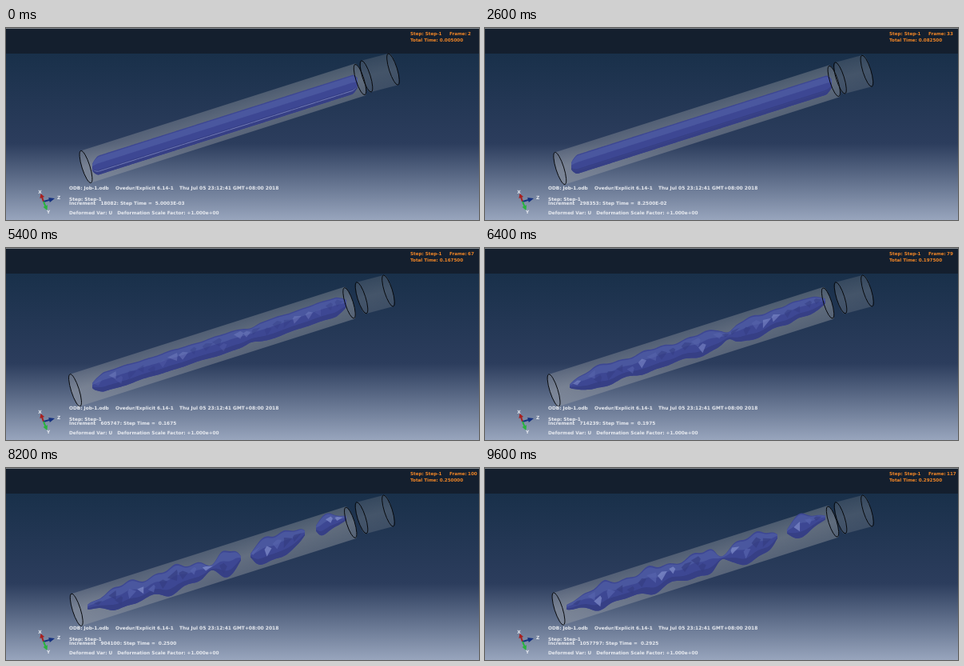
Animation of 592x240 px, one loop 9.8 s. Source, as an HTML page with a canvas:

```html
<!DOCTYPE html>
<html lang="en">
<head>
<meta charset="utf-8">
<title>Tube simulation</title>
<style>
html, body { margin: 0; width: 100%; height: 100%; overflow: hidden; background: #141f2e; }
canvas { display: block; }
</style>
</head>
<body>
<canvas id="stage" width="592" height="240"></canvas>
<script>
const ctx = document.getElementById('stage').getContext('2d');
const STEP_MS = 200, STEPS = 49;
const SLOPE = -0.317, TILT = Math.atan(SLOPE);

// Places where the fluid column pinches, strongest at the step `peak`
const necks = [
  { x: 257, drift: 0, peak: 41, span: 4, width: 10, depth: 0.75 },
  { x: 300, drift: -0.5, peak: 41, span: 11, width: 9, depth: 1.25 },
  { x: 381, drift: -1.3, peak: 44, span: 9, width: 10, depth: 1.4 }
];

const lerp = (a, b, f) => a + (b - a) * f;
const clamp01 = v => Math.max(0, Math.min(1, v));
const ramp = (v, from, to) => clamp01((v - from) / (to - from));
const smooth = (v, from, to) => { const f = ramp(v, from, to); return f * f * (3 - 2 * f); };
const bell = v => Math.exp(-v * v);
const noise = n => { const v = Math.sin(n * 12.9898) * 43758.5453; return v - Math.floor(v); };
const axisY = x => 174 + SLOPE * (x - 100);

function fluidEdges(step) {
  const rough = smooth(step, 22, 41);
  const left = 108 - 7 * smooth(step, 27, 41);
  const right = 441 - 14 * smooth(step, 0, 27);
  const taper = lerp(8, 50, rough);

  return x => {
    const fromEnd = Math.min(x - left, right - x);
    let half = (12 + 2 * rough) * Math.sqrt(clamp01((fromEnd + 1) / taper));
    half *= 1 + 0.2 * rough * Math.cos((x - 208) * 0.1);
    for (const n of necks) {
      const center = n.x + n.drift * (step - 41);
      half *= 1 - clamp01(n.depth * bell((step - n.peak) / n.span) * bell((x - center) / n.width));
    }
    const mid = axisY(x) + 2.5 - 2 * ramp(step, 0, 19) - 9 * rough * smooth(x, 330, 400);
    const wobble = rough * half / 7;
    return {
      x,
      top: mid - half + wobble * Math.sin(x * 0.23 + step * 0.3),
      bottom: mid + half + wobble * Math.sin(x * 0.17 - step * 0.2)
    };
  };
}

function polygon(points, color) {
  ctx.fillStyle = color;
  ctx.beginPath();
  points.forEach(([x, y]) => ctx.lineTo(x, y));
  ctx.closePath();
  ctx.fill();
}

function text(str, x, y, color = '#e6e9ef', size = 5.8) {
  ctx.font = `bold ${size}px "DejaVu Sans", sans-serif`;
  ctx.fillStyle = color;
  ctx.fillText(str, x, y);
}

function drawBackground() {
  const g = ctx.createLinearGradient(0, 32, 0, 240);
  g.addColorStop(0, '#19304a');
  g.addColorStop(0.54, '#2c3d5d');
  g.addColorStop(1, '#98a5bd');
  ctx.fillStyle = g;
  ctx.fillRect(0, 0, 592, 240);
  ctx.fillStyle = '#141f2e';
  ctx.fillRect(0, 0, 592, 32);
  ctx.fillStyle = '#868b90';
  ctx.fillRect(0, 0, 592, 1);
}

function ring(x, y, radius) {
  ctx.strokeStyle = '#07090c';
  ctx.lineWidth = 1;
  ctx.beginPath();
  ctx.ellipse(x, y, 5, radius, TILT, 0, Math.PI * 2);
  ctx.stroke();
}

function cylinder(x1, y1, x2, y2, radius, opacity) {
  const length = Math.hypot(x2 - x1, y2 - y1);
  const shade = ctx.createLinearGradient(0, -radius, 0, radius);
  [0.8, 1.15, 0.9].forEach((k, i) => shade.addColorStop(i / 2, `rgba(165,168,172,${opacity * k})`));
  ctx.save();
  ctx.translate(x1, y1);
  ctx.rotate(Math.atan2(y2 - y1, x2 - x1));
  ctx.fillStyle = shade;
  ctx.beginPath();
  ctx.ellipse(0, 0, 5, radius, 0, Math.PI / 2, Math.PI * 1.5);
  ctx.ellipse(length, 0, 5, radius, 0, -Math.PI / 2, Math.PI / 2);
  ctx.fill();
  ctx.restore();
}

function drawFluid(step) {
  const edge = fluidEdges(step), runs = [];
  let run = null;
  for (let x = 98; x <= 443; x += 2) {
    const e = edge(x);
    if (e.bottom - e.top < 2) { run = null; continue; }
    if (!run) runs.push(run = []);
    run.push(e);
  }
  const at = (e, v) => [e.x, lerp(e.top, e.bottom, v)];
  const band = (v1, v2, color) => runs.forEach(r =>
    polygon([...r.map(e => at(e, v1)), ...r.map(e => at(e, v2)).reverse()], color));

  band(0, 1, '#3d4793');
  band(0.06, 0.4, '#4a579f');
  band(0.75, 1, '#363f85');
  band(0.8, 0.84, `rgba(150,160,212,${0.6 * (1 - ramp(step, 0, 14))})`);

  // Surface facets, appearing as the column breaks up
  const rough = ramp(step, 17, 36);
  for (let i = 0; i < 24; i++) {
    const x = 110 + 13 * i + 6 * noise(i), size = 7 + 6 * noise(i + 3);
    const a = edge(x), b = edge(x + size), c = edge(x + size * noise(i + 9));
    if ([a, b, c].some(e => e.bottom - e.top < 7)) continue;
    const v = 0.1 + 0.45 * noise(i + 50), glow = Math.sin(i * 7.3 + step * 0.25);
    const color = glow > 0.7 ? '130,142,204' : glow > 0 ? '86,99,172' : '52,61,130';
    polygon([at(a, v + 0.1), at(c, v), at(b, v + 0.12), at(c, v + 0.4)], `rgba(${color},${0.7 * rough})`);
  }
}

function arrow(label, dx, dy, color) {
  const x = 47, y = 217, length = Math.hypot(dx, dy);
  const nx = -dy / length, ny = dx / length;
  const side = (f, w) => [x + dx * f + nx * w, y + dy * f + ny * w];
  polygon([side(0, 1), side(0.6, 1), side(0.6, -1), side(0, -1)], color);
  polygon([side(1, 0), side(0.5, 3), side(0.5, -3)], color);
  text(label, x + dx * 1.35 - 2, y + dy * 1.2 + 2);
}

function formatTime(seconds) {
  if (seconds >= 0.1) return seconds.toFixed(4);
  return (seconds + 3e-7).toExponential(4).replace('e-', 'E-0');
}

function drawLabels(step) {
  const frame = Math.round(lerp(2, 117, step / 48)), seconds = frame * 0.0025;
  const orange = '#ee8527';
  text('Step: Step-1', 506, 9, orange, 5.6);
  text('Frame:', 555, 9, orange, 5.6);
  text(frame, 578, 9, orange, 5.6);
  text('Total Time: ' + seconds.toFixed(6), 506, 17, orange, 5.6);

  text('ODB: Job-1.odb', 79, 202);
  text('Ovedur/Explicit 6.14-1', 137, 202);
  text('Thu Jul 05 23:12:41 GMT+08:00 2018', 217, 202, undefined, 5.95);
  text('Step: Step-1', 79, 216);
  text(`Increment   ${Math.round(seconds * 3616400)}: Step Time =  ${formatTime(seconds)}`, 79, 221);
  text('Deformed Var: U   Deformation Scale Factor: +1.000e+00', 79, 232.5);
}

function draw(step) {
  drawBackground();
  // The cap strikes the tube, which slides away and later rebounds
  const x = 100 - 14 * ramp(step, 1, 28) + 6 * ramp(step, 30, 48) ** 2, y = axisY(x) - 0.5;
  const endX = x + 343, endY = y - 109;
  const capX = 484.5 - 7.5 * ramp(step, 0, 3) + 1.5 * ramp(step, 3, 19);
  const capY = 53.5 + SLOPE * (capX - 478.5);
  const backX = capX - 33.5, backY = capY + 8.8;

  cylinder(backX, backY, capX, capY, 20.5, 0.25);
  cylinder(x, y, endX, endY, 21, 0.42);
  drawFluid(step);
  ring(x, y, 21);
  ring(endX, endY, 20);
  ring(backX, backY, 20.5);
  ring(capX, capY, 20.5);

  arrow('X', -3.5, -10, '#a8201f');
  arrow('Z', 14, -4, '#14307f');
  arrow('Y', 4.5, 11, '#2ab33f');
  drawLabels(step);
}

const start = performance.now();
function tick() {
  draw(Math.floor((performance.now() - start) / STEP_MS) % STEPS);
  requestAnimationFrame(tick);
}
tick();
</script>
</body>
</html>
```
